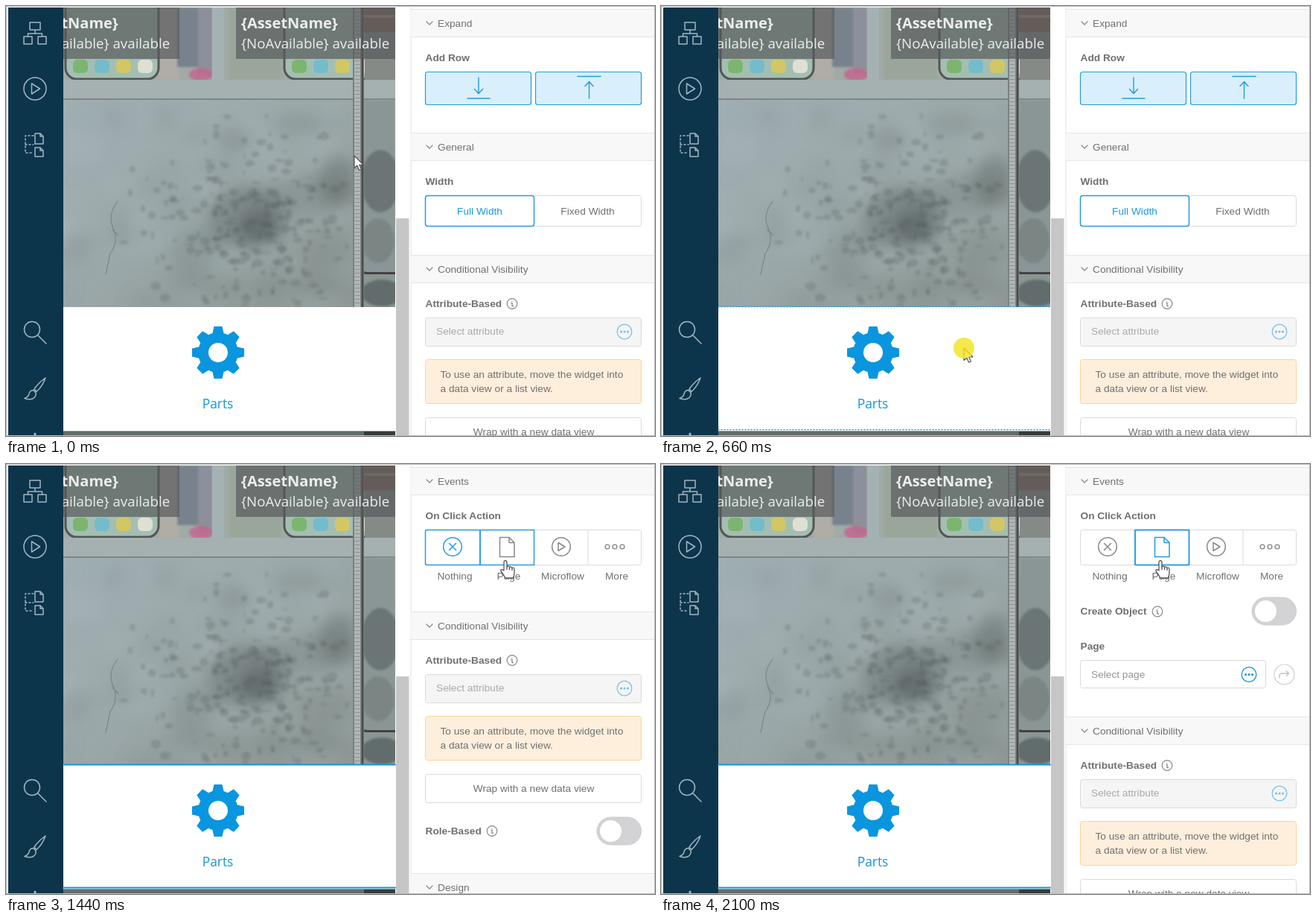
Recreate the animation shown at these times as an HTML page. Size 872x577 px, loop 2.22 s.

```html
<!DOCTYPE html>
<html lang="en">
<head>
<meta charset="utf-8">
<title>Page editor</title>
<style>
html, body { margin: 0; width: 100%; height: 100%; overflow: hidden; background: #fff; }
svg { display: block; width: 872px; height: 577px; }
text { font: 13.7px "Liberation Sans", Arial, sans-serif; fill: #707072; }
.b { font-weight: bold; }
.c { text-anchor: middle; }
.pale { fill: #a9a9ac; }
.blue { fill: #1a98dc; }
.app { font: 18.7px "Open Sans", sans-serif; fill: #eceeee; }
.title { font-size: 20px; font-weight: bold; }
.line { fill: none; stroke-linecap: round; stroke-linejoin: round; }
</style>
</head>
<body>
<svg id="stage" viewBox="0 0 872 577"></svg>
<script>
const BLUE = '#259cde', GREY = '#88888a', EDGE = '#dadadc';

const text = (x, y, s, cls = '') => `<text x="${x}" y="${y}" class="${cls}">${s}</text>`;
const rect = (x, y, w, h, fill, stroke = 'none', r = 0, sw = 1, o = 1) =>
  `<rect x="${x}" y="${y}" width="${w}" height="${h}" rx="${r}" fill="${fill}" stroke="${stroke}" stroke-width="${sw}" opacity="${o}"/>`;
const line = (d, stroke, w = 1.5, extra = '') =>
  `<path class="line" d="${d}" stroke="${stroke}" stroke-width="${w}" ${extra}/>`;
const dot = (x, y, r, fill, stroke = 'none', w = 1.5) =>
  `<circle cx="${x}" cy="${y}" r="${r}" fill="${fill}" stroke="${stroke}" stroke-width="${w}"/>`;
const blob = (x, y, rx, ry, fill, o) =>
  `<ellipse cx="${x}" cy="${y}" rx="${rx}" ry="${ry}" fill="${fill}" opacity="${o}"/>`;
const group = (id, body, attrs = '') => `<g id="${id}" ${attrs}>${body}</g>`;
const blur = (id, body) => `<g filter="url(#${id})">${body}</g>`;

let seed = 7;
const rnd = () => (seed = seed * 16807 % 2147483647) / 2147483647;
const spread = () => rnd() + rnd() + rnd() - 1.5;

function sidebar() {
  const c = '#a3b5c0', l = (d, w = 1.5) => line(d, c, w);
  return rect(3, 2, 74, 574, '#0c354c') +
    l('M32 22h14v10h-14zM24 41h11v10h-11zM43 41h11v10h-11zM39 32v5M29.5 41v-4h19v4') +
    dot(39, 111, 15, 'none', c) + l('M34.5 104v14l11-7z') +
    l('M39 171h7l4 4v10h-11zM46 171v4h4M39 190h7l4 4v8h-11zM46 190v4h4') +
    line('M37 174h-11v23h11M26 186h11', c, 1.5, 'stroke-dasharray="2 3"') +
    dot(35, 434, 10.5, 'none', c) + l('M43 442l11 11') +
    l('M53 499q-9 6-15 15l3 3.5q8-7 12-18.5zM37 515.5q-5 0-6 5-1 4-6 6 9 3 13-1 3-3 2-6.5z') +
    l('M39 574v4', 3);
}

function phone(x) {
  const icons = ['#7cb56f', '#74bccb', '#d3c765', '#dfdfd4'];
  return rect(x + 3, -40, 125, 138, '#a3bfb3', '#555556', 15, 3) +
    icons.map((c, i) => rect(x + 13 + i * 29, 72, 20, 18, c, 'none', 6)).join('');
}

function wall() {
  let mottles = '', specks = '';
  for (let i = 0; i < 80; i++)
    mottles += blob(77 + rnd() * 390, 130 + rnd() * 270, 6 + rnd() * 30, 4 + rnd() * 16,
      rnd() < .5 ? '#b3c0c4' : '#7f8a8b', .22);
  for (let i = 0; i < 240; i++)
    specks += blob(330 + spread() * 130, 290 + spread() * 110, 1.5 + rnd() * 6, 1 + rnd() * 5, '#4f5756', .22);
  const stains = blob(325, 285, 55, 42, '#5d6564', .4) + blob(338, 295, 28, 24, '#444b4a', .35) +
    blob(308, 180, 24, 18, '#6d7677', .35) + blob(400, 255, 60, 26, '#717b7a', .3) +
    blob(445, 235, 26, 34, '#5a615f', .4) + blob(255, 325, 36, 28, '#727d7b', .3) +
    blob(360, 380, 110, 14, '#7d8783', .35) + blob(430, 340, 34, 38, '#7d8785', .3);
  return rect(77, 2, 446, 402, 'url(#wall)') + blur('soft', mottles + stains) + blur('fine', specks) +
    line('M150 262q-14 18-6 36t-4 34l-6 28M143 300l8 8', '#7b8787', 1.2);
}

function pipes() {
  const dark = rect(481, 126, 42, 278, '#8a9595') + blob(503, 235, 26, 42, '#545b5a', .55) +
    blob(500, 315, 22, 30, '#6c7675', .5) + blob(505, 385, 28, 18, '#4c5352', .6);
  return blur('fine', dark) +
    rect(468, 2, 55, 34, '#846554') + rect(482, 35, 41, 64, '#858a87') +
    line('M468 14h55', '#a98a72', 4) +
    rect(466, 2, 15, 402, '#7a8181') + rect(468, 2, 8, 402, '#b0b6b6') +
    line('M472 3V403', '#8b9191', 7, 'stroke-dasharray="1 4" style="stroke-linecap:butt"') +
    line('M479 2V403', '#4b4a49', 2.5) +
    line('M483 358h40', '#43423f', 4) + line('M484 356.5h39', '#96958f', 1);
}

function photo() {
  const cards = rect(77, 2, 446, 98, '#a0aaa6') +
    blur('fine', rect(205, 2, 28, 97, '#b0aca6') + rect(230, 2, 30, 80, '#78828c') +
      rect(258, 2, 19, 90, '#8d8f9a') + blob(262, 92, 16, 9, '#c4638f', .8) +
      rect(300, 2, 70, 97, '#9aa69a')) +
    phone(77) + phone(371) + rect(277, 2, 16, 98, '#a5b2b4') +
    rect(77, 99, 446, 26, '#a5b0b0') + line('M77 125H523', '#727a79', 1.6);
  return `<g clip-path="url(#photo)">` + wall() + cards + pipes() +
    rect(77, 2, 156, 69, '#56595a', 'none', 0, 0, .68) + rect(309, 2, 214, 69, '#56595a', 'none', 0, 0, .68) +
    [21, 316].map(x => text(x, 30, '{AssetName}', 'app title') +
      text(x, 57, '{NoAvailable} available', 'app')).join('') + `</g>`;
}

function widget() {
  let teeth = '';
  for (let a = 0; a < 360; a += 45)
    teeth += `<path d="M-8-24L-5.5-35H5.5L8-24Z" transform="rotate(${a})"/>`;
  return rect(77, 404, 446, 165, '#fff') + rect(77, 570, 446, 6, '#636b6b') +
    rect(481, 570, 42, 6, '#353a3a') + line('M77 570.5H523', '#8e9999', 1) +
    `<g transform="translate(285 465)" fill="#0a95df">${teeth}${dot(0, 0, 27, '#0a95df')}${dot(0, 0, 13, '#fff')}</g>` +
    `<text x="284.5" y="540" class="app c" style="font-size:17.4px;fill:#1596d6">Parts</text>` +
    group('hover', line('M77 403.5H523M77 568.5H523', BLUE, 1.5, 'stroke-dasharray="1 3"')) +
    group('chosen', line('M77 403.5H523M77 568.5H523', '#1795d8', 2));
}

const header = (y, s) => rect(544, y - 19, 328, 37, '#f8f8f8') +
  line(`M544 ${y - 18.5}H872M544 ${y + 18.5}H872`, '#e4e4e4', 1) +
  line(`M565 ${y - 2}l4 4 4-4`, GREY, 1.2) + text(580, y + 5, s);
const label = (y, s) => text(563.5, y + 5, s, 'b');
const info = (x, y) => dot(x, y, 6.8, 'none', GREY, 1.2) +
  line(`M${x - 1} ${y - 1}h1v4h1.5M${x - .2} ${y - 3.4}v.1`, GREY, 1.3);
const more = (x, y, c) => dot(x, y, 9.8, 'none', c, 1.3) +
  [-4.5, 0, 4.5].map(d => dot(x + d, y, 1.6, c)).join('');
const toggle = y => rect(794, y - 18.5, 59.5, 37, '#d3d3d5', '#cbcbcd', 18.5) + dot(812.5, y, 14.5, '#fff');

const visibility = y => `<g transform="translate(0 ${y})">` +
  header(0, 'Conditional Visibility') + label(46, 'Attribute-Based') + info(680, 46.5) +
  rect(563.5, 65.5, 290, 38, '#f5f5f5', EDGE, 3) + text(578, 88, 'Select attribute', 'pale') + more(831, 84, '#7dbfe6') +
  rect(563.5, 121.5, 290, 59, '#feefdc', '#f9d49b', 3) +
  text(583.5, 146, 'To use an attribute, move the widget into') + text(583.5, 165, 'a data view or a list view.') +
  rect(563.5, 199.5, 290, 38, '#fff', EDGE, 3) + text(709, 223, 'Wrap with a new data view', 'c') +
  label(275, 'Role-Based') + info(653, 275.5) + toggle(275.5) + header(351, 'Design') + `</g>`;

const rowPanel = () => header(23, 'Expand') + label(69, 'Add Row') +
  rect(563.5, 88.5, 142, 44, '#d9effb', BLUE, 3, 1.2) + rect(711.5, 88.5, 142, 44, '#d9effb', BLUE, 3, 1.2) +
  line('M635 96v21M629.5 111.5l5.5 6 5.5-6M620 124h30M783.5 124v-22M778 107.5l5.5-6 5.5 6M768 94.5h31', BLUE, 1.4) +
  header(189, 'General') + label(235, 'Width') +
  rect(563.5, 254.5, 290, 41, '#fff', EDGE, 3) + rect(563.5, 254.5, 146, 41, '#fff', BLUE, 3, 1.5) +
  text(636.5, 280, 'Full Width', 'c blue') + text(781.5, 280, 'Fixed Width', 'c') + visibility(353);

function eventPanel(page) {
  const a = page ? GREY : BLUE, b = page ? BLUE : GREY;
  const names = ['Nothing', 'Page', 'Microflow', 'More'];
  return header(23, 'Events') + label(69, 'On Click Action') +
    rect(563.5, 88.5, 290, 47, '#fff', EDGE, 3) + line('M637 89v46M709.5 89v46M782 89v46', EDGE, 1) +
    rect(page ? 637 : 563.5, 88.5, page ? 72.5 : 73.5, 47, 'none', BLUE, 2, 1.5) +
    dot(600, 111, 12.3, 'none', a) + line('M595.5 106.5l9 9M604.5 106.5l-9 9', a) +
    line('M663.5 98.5h12.5l7 7v19h-19.5zM676 98.5v7h7', b) +
    dot(746, 111, 12.3, 'none', GREY) + line('M742 105.5v11l9-5.5z', GREY) +
    [808, 818, 828].map(x => dot(x, 111, 2.9, 'none', GREY, 1.4)).join('') +
    names.map((s, i) => text(603 + i * 72.5, 155, s, 'c')).join('') +
    (page ? label(197, 'Create Object') + info(667, 198) + toggle(197.5) + label(244, 'Page') +
      rect(563.5, 263.5, 249, 37, '#fff', EDGE, 3) + `<g opacity=".75">${text(578, 287, 'Select page')}</g>` +
      more(790, 282.5, '#1592da') + dot(837.5, 282.5, 13.5, 'none', '#cfcfd2', 1.2) +
      line('M831 287v-3q0-3 3-3h9M840 277.5l3.5 3.5-3.5 3.5', '#c3c3c6', 1.3) : '') +
    visibility(page ? 358 : 217);
}

const stage = document.getElementById('stage');
stage.innerHTML = `<defs>
  <linearGradient id="wall" x2=".8" y2="1"><stop stop-color="#9fafb5"/><stop offset=".5" stop-color="#9eabad"/><stop offset="1" stop-color="#8e9896"/></linearGradient>
  <filter id="soft" x="-20%" y="-20%" width="140%" height="140%"><feGaussianBlur stdDeviation="10"/></filter>
  <filter id="fine"><feGaussianBlur stdDeviation="1.6"/></filter>
  <clipPath id="photo"><rect x="77" y="2" width="446" height="402"/></clipPath></defs>` +
  rect(0, 0, 872, 577, '#fff') + sidebar() + photo() + widget() +
  rect(524, 285, 17.5, 292, '#c6c6c7') + line('M544 2V576', '#e2e2e4', 1) +
  group('row', rowPanel()) + group('events', eventPanel(false)) + group('page', eventPanel(true)) +
  group('over', rect(637, 88.5, 72.5, 47, 'none', BLUE, 0, 1.5)) +
  line('M0 .5H872M0 576.5H872M.5 0V577M871.5 0V577', '#b9b9bb', 1) +
  group('arrow', '<path d="M0 0V16.5L3.8 13 6.6 19.2 9.4 18 6.7 12H12Z"/>',
    'fill="#fff" stroke="#55525a" stroke-width="1.2" stroke-linejoin="round"') +
  group('hand', '<path d="M-2 1Q0-2 2 1V8Q4 6 5.5 8.5 7.5 7 9 9.5 12 8 12 12V16Q12 20 10 23H0Q-2 19-6 14-7 10-2 13Z"/><path d="M2 8v4M5.5 8.5V12M9 9.5V13"/>',
    'fill="#fff" stroke="#55525a" stroke-width="1.3" stroke-linejoin="round"') +
  group('click', dot(0, 0, 14, '#f3e21c'), 'opacity=".8"');

// time, pointer x and y, panel, pressed
const steps = [
  [0, 468, 201, 'row'], [100, 446, 294, 'row'], [220, 416, 421, 'row'],
  [320, 407, 459, 'row'], [660, 407, 459, 'row', true], [880, 407, 459, 'events'],
  [1220, 506, 379, 'events'], [1320, 608, 225, 'events'], [1440, 671, 130, 'events'],
  [1780, 671, 130, 'events', true], [2000, 671, 130, 'page']
];
const el = id => document.getElementById(id);
const show = (id, on) => el(id).style.display = on ? '' : 'none';

function draw(now) {
  const t = now % 2220;
  const [, x, y, panel, pressed] = steps.filter(s => s[0] <= t).pop();
  const onPage = x === 671;
  for (const id of ['row', 'events', 'page']) show(id, id === panel);
  show('hover', panel === 'row' && y > 403);
  show('chosen', panel !== 'row');
  show('over', onPage);
  show('arrow', !onPage);
  show('hand', onPage);
  show('click', pressed);
  for (const id of ['arrow', 'hand', 'click']) el(id).setAttribute('transform', `translate(${x} ${y})`);
  requestAnimationFrame(draw);
}
requestAnimationFrame(draw);
</script>
</body>
</html>
```
